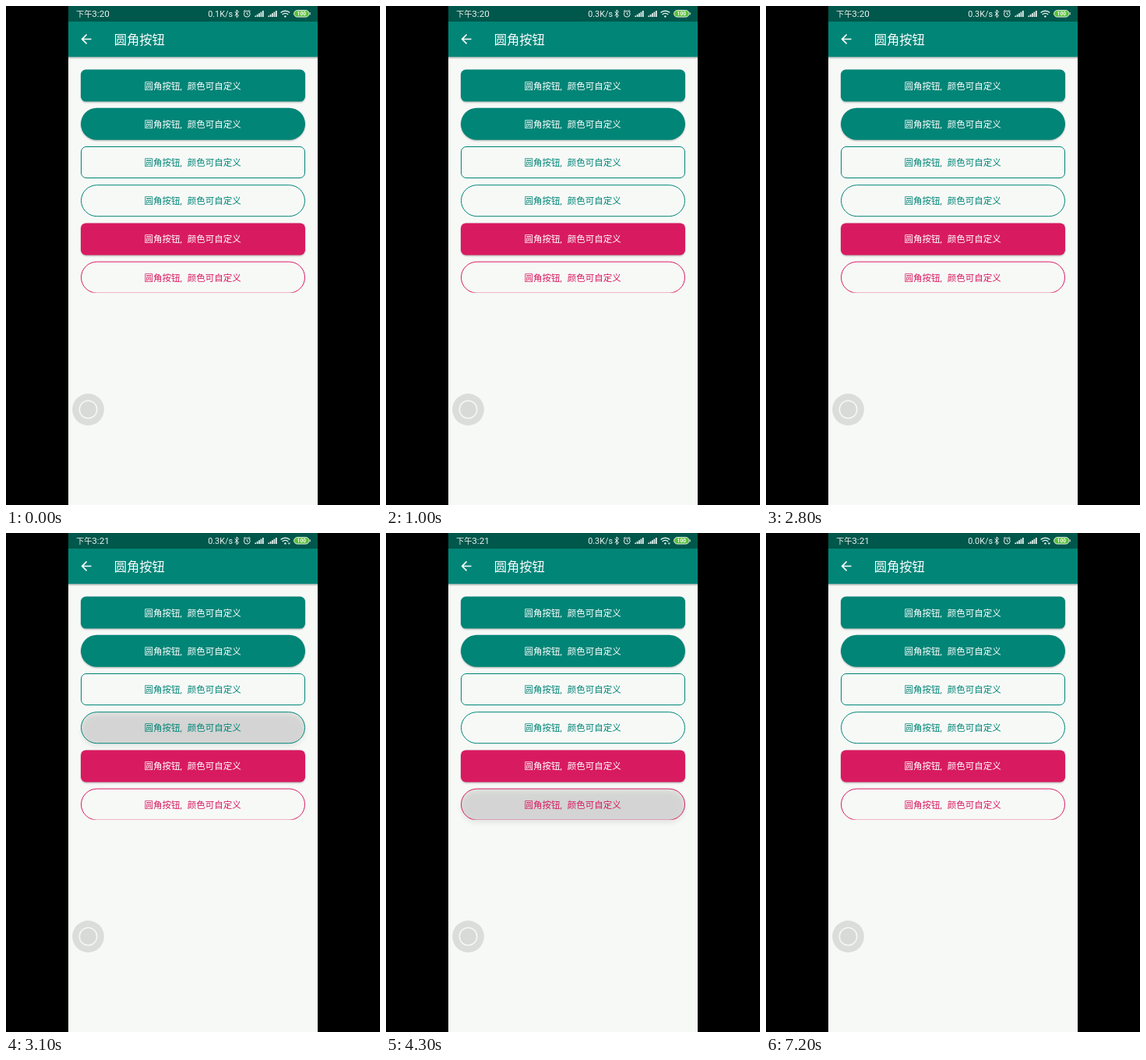
Recreate the animation shown at these times as an HTML page. Size 480 by 640 pixels, loop 8000 ms.

```html
<!DOCTYPE html>
<html lang="zh-CN">
<head>
<meta charset="utf-8">
<title>圆角按钮</title>
<style>
  html, body { margin: 0; width: 100%; height: 100%; overflow: hidden; background: #000; }
  svg { display: block; width: 480px; height: 640px; }
  text { font-family: Roboto, "Noto Sans CJK SC", "Noto Sans CJK", sans-serif; }
</style>
</head>
<body>
<svg id="stage" viewBox="0 0 480 640" xmlns="http://www.w3.org/2000/svg">
  <defs>
    <linearGradient id="drop" x1="0" y1="0" x2="0" y2="1">
      <stop offset="0" stop-color="#000" stop-opacity=".27"/>
      <stop offset="1" stop-color="#000" stop-opacity="0"/>
    </linearGradient>
    <clipPath id="cut"><rect x="80" y="320" width="320" height="47.8"/></clipPath>
  </defs>
  <rect width="480" height="640"/>
  <rect x="80" width="320" height="640" fill="#f7f9f7"/>
  <rect x="80" y="65" width="320" height="3.6" fill="url(#drop)"/>
  <rect x="80" y="20" width="320" height="45.3" fill="#008577"/>
  <rect x="80" width="320" height="20" fill="#00574b"/>

  <g fill="#e9f3f1">
    <text x="90" y="13.8" font-size="10.3">下午</text>
    <text id="clock" x="110.3" y="14" font-size="11.7"></text>
    <text id="speed" x="291" y="14" font-size="10.8" text-anchor="end"></text>
    <g id="bars"></g>
    <circle cx="358.4" cy="13.4" r="1.2"/>
    <path id="wifiMark" d="M361.4 12.4h3.8l-1.9 2.6z"/>
  </g>
  <g fill="none" stroke="#e9f3f1" stroke-width="1">
    <path d="M293.6 7.3l5 4.9-2.6 2.5V5l2.6 2.5-5 4.9"/>
    <circle cx="309.3" cy="10.2" r="3.9"/>
    <path d="M309.3 8v2.4l1.7 1M304.9 7.1l2.3-1.9M313.7 7.1l-2.3-1.9"/>
    <path d="M352.6 8.6a8.2 8.2 0 0 1 11.6 0M354.6 10.9a5.4 5.4 0 0 1 7.6 0" stroke-width="1.4"/>
  </g>
  <rect x="369.6" y="5.6" width="19.4" height="8.4" rx="4.2" fill="#5cc03c" stroke="#e9f3f1"/>
  <path d="M390.2 8.3v3" stroke="#e9f3f1"/>
  <text x="379.3" y="12.2" font-size="6.6" font-weight="700" fill="#fff" text-anchor="middle">100</text>

  <path transform="translate(93.2 32.7) scale(.815)" fill="#fff"
    d="M20 11H7.83l5.59-5.59L12 4l-8 8 8 8 1.41-1.41L7.83 13H20z"/>
  <text x="138.7" y="49" font-size="16.3" fill="#fff">圆角按钮</text>

  <g id="buttons"></g>

  <circle cx="105.5" cy="517.5" r="20.4" fill="#dbdddb"/>
  <circle cx="105.5" cy="517.5" r="11.2" fill="#d8dad8" stroke="#f6f8f6" stroke-width="1.5"/>
</svg>
<script>
const LOOP = 8000, STEP = 100, RISE = 200;
const TEAL = '#008577', PINK = '#d81b60';
const TEAL_DARK = '#006459', PINK_DARK = '#a21448';
const GREY = 'rgba(96,96,96,.133)';
const $ = id => document.getElementById(id);

// Each button is touched once, from "down" to "up".
const specs = [
  { color: TEAL, dark: TEAL_DARK, solid: true, r: 6.5, down: 500, up: 700 },
  { color: TEAL, dark: TEAL_DARK, solid: true, r: 20.4, down: 1500, up: 1700 },
  { color: TEAL, r: 6.5, down: 2400, up: 2800 },
  { color: TEAL, r: 20.2, down: 3000, up: 3400 },
  { color: PINK, dark: PINK_DARK, solid: true, r: 6.5, down: 3500, up: 3900 },
  { color: PINK, r: 20.2, down: 4200, up: 4600, cut: true }
];

function add(parent, tag, attrs, text) {
  const el = document.createElementNS('http://www.w3.org/2000/svg', tag);
  for (const key in attrs) el.setAttribute(key, attrs[key]);
  if (text) el.textContent = text;
  parent.appendChild(el);
  return el;
}

function makeButton(spec, i) {
  const y = 81.6 + i * 49.2, g = add($('buttons'), 'g', {});
  const filter = add($('stage').querySelector('defs'), 'filter',
    { id: 'blur' + i, x: '-10%', y: '-50%', width: '120%', height: '220%' });
  const blur = add(filter, 'feGaussianBlur', { stdDeviation: 1 });
  const shadow = add(g, 'rect',
    { x: 96.3, width: 287.4, height: 40.8, rx: spec.r, filter: `url(#blur${i})` });
  const inset = spec.solid ? 0 : .5;
  const face = add(g, 'rect', {
    x: 96 + inset, y: y + inset, width: 288 - 2 * inset, height: 41 - 2 * inset, rx: spec.r,
    stroke: spec.solid ? 'none' : spec.color, 'stroke-width': 1
  });
  if (spec.cut) face.setAttribute('clip-path', 'url(#cut)');
  const label = add(g, 'text',
    { y: y + 25, 'font-size': 11.5, fill: spec.solid ? '#fff' : spec.color });
  add(label, 'tspan', { x: 177.6 }, '圆角按钮,');
  add(label, 'tspan', { x: 232.8 }, '颜色可自定义');
  return { ...spec, y, blur, shadow, face };
}

const buttons = specs.map(makeButton);

for (const x of [319.4, 336.4])
  for (let i = 0; i < 5; i++) {
    const h = 1.6 + i * 1.6;
    add($('bars'), 'rect', { x: x + i * 2.4, y: 14 - h, width: 1.7, height: h });
  }

const clamp = v => Math.max(0, Math.min(1, v));

function drawButton(b, t) {
  const pressed = t >= b.down && t < b.up;
  const top = clamp((Math.min(t, b.up) - b.down + STEP) / RISE);
  const lift = t < b.down ? 0 : t < b.up ? top : clamp(top - (t - b.up + STEP) / STEP);
  const rest = b.solid ? .3 : 0, raised = b.solid ? .36 : .07;
  b.face.setAttribute('fill', pressed ? b.dark || GREY : b.solid ? b.color : 'none');
  b.shadow.setAttribute('y', b.y + 1.2 + 2.6 * lift);
  b.shadow.setAttribute('opacity', rest + (raised - rest) * lift);
  b.blur.setAttribute('stdDeviation', 1.1 + 1.9 * lift);
}

function draw(ms) {
  const t = Math.floor((ms % LOOP) / STEP) * STEP;
  buttons.forEach(b => drawButton(b, t));
  $('clock').textContent = t < 3000 ? '3:20' : '3:21';
  $('speed').textContent = t < 1000 ? '0.1K/s' : t < 5000 ? '0.3K/s' : '0.0K/s';
  $('wifiMark').setAttribute('opacity', t < 3000 ? 0 : t < 7200 ? .8 : 1);
}

const start = performance.now();
function tick() {
  draw(performance.now() - start);
  requestAnimationFrame(tick);
}
tick();
</script>
</body>
</html>
```
